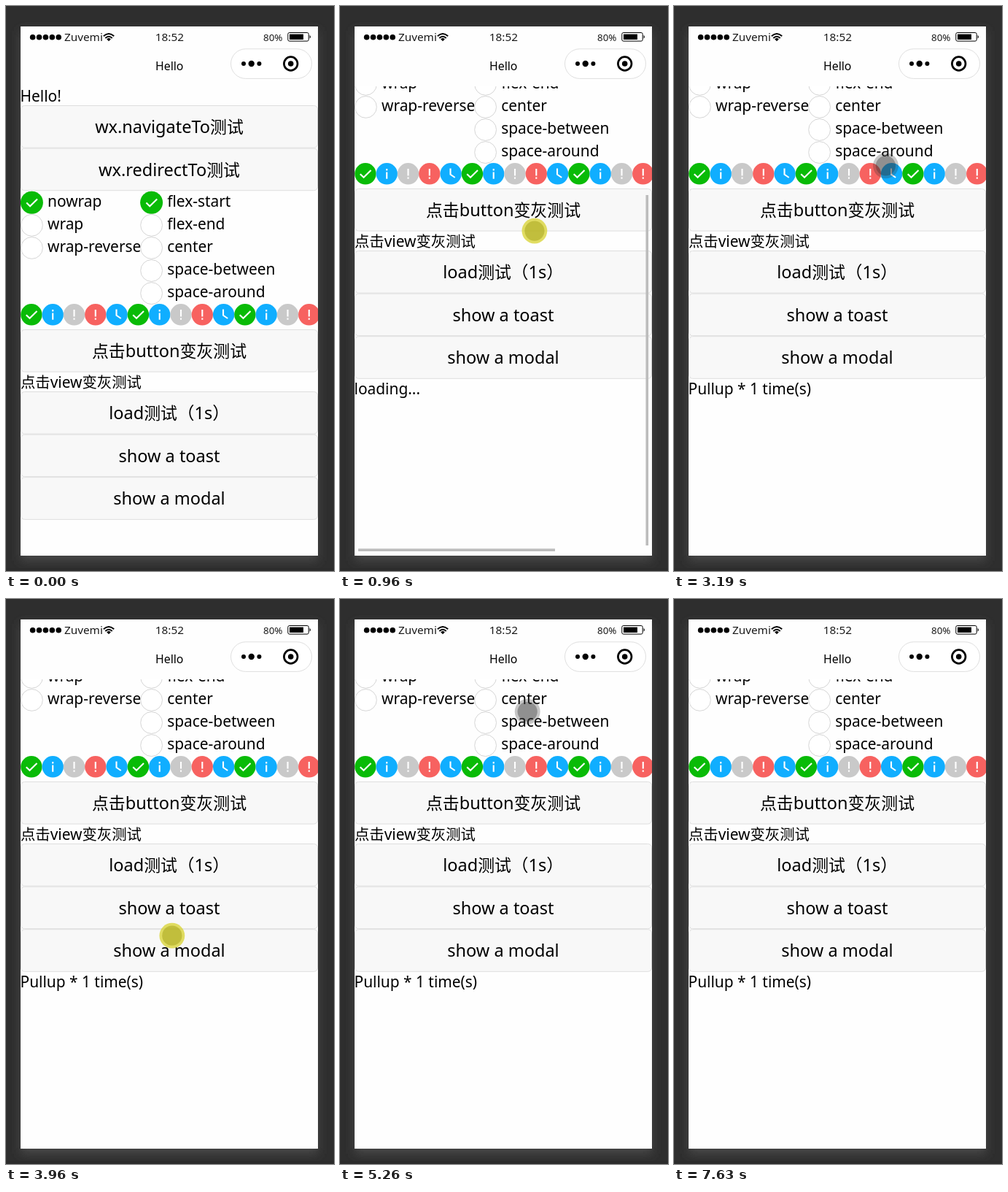
Recreate the animation shown at these times as an HTML page. Size 450 by 774 pixels, loop 7760 ms.

```html
<!DOCTYPE html>
<html lang="zh-CN">
<head>
<meta charset="utf-8">
<title>Hello</title>
<style>
html, body { margin: 0; width: 100%; height: 100%; overflow: hidden; background: #2e2e2e; }
svg { display: block; width: 450px; height: 774px; }
text { font-family: "Noto Sans", "Noto Sans CJK SC", "Noto Sans CJK", sans-serif; font-size: 20.9px; fill: #000; white-space: pre; }
.han { font-size: .975em; }
.button text { font-size: 23.5px; text-anchor: middle; }
.button rect { fill: #f8f8f8; stroke: #dedede; }
.glyph { fill: none; stroke: #fff; stroke-width: 2.1; }
.status { font-size: 15.3px; fill: #1a1a1a; }
</style>
</head>
<body>
<svg viewBox="0 0 450 774" xmlns="http://www.w3.org/2000/svg">
  <defs>
    <clipPath id="view"><rect x="20" y="110" width="408" height="643"/></clipPath>
    <filter id="soft" x="-20%" y="-20%" width="140%" height="140%"><feGaussianBlur stdDeviation="7"/></filter>
  </defs>
  <rect width="450" height="774" fill="#2e2e2e"/>
  <rect x="20" y="34" width="408" height="726" fill="#484848" filter="url(#soft)"/>
  <rect y="770" width="450" height="4" fill="#2c2c2c"/>
  <rect x="20" y="28" width="408" height="725" fill="#fefefe"/>

  <g clip-path="url(#view)">
    <g id="page"></g>
    <g id="bars" fill="#bcbcbc">
      <rect id="thumb" x="419.5" width="3.6" height="480"/>
      <rect x="25" y="743.4" width="270" height="3.6"/>
    </g>
  </g>

  <g id="signal"></g>
  <text class="status" x="80" y="47.5">Zuvemi</text>
  <path d="M133.8 41.2Q141 34.6 148.2 41.2M136.3 44Q141 39.6 145.7 44" fill="none" stroke="#000" stroke-width="1.9"/>
  <path d="M138.2 45.4Q141 42.8 143.8 45.4L141 48.2Z"/>
  <text class="status" x="224.4" y="47.8" text-anchor="middle">18:52</text>
  <text class="status" x="353" y="47.5" style="font-size:13.4px">80%</text>
  <rect x="386.8" y="36.5" width="28.4" height="11.6" rx="2" fill="none" stroke="#000"/>
  <rect x="389" y="38.6" width="19" height="7.4"/>
  <path d="M416.6 39.8Q419.4 42.3 416.6 44.8Z"/>

  <text x="224.2" y="88" text-anchor="middle" style="font-size:15.8px">Hello</text>
  <rect x="308.5" y="58.8" width="111" height="40.6" rx="20.3" fill="#fff" stroke="#dfdfdf"/>
  <circle cx="326" cy="79" r="3"/><circle cx="336.7" cy="79" r="4.2"/><circle cx="347.4" cy="79" r="3"/>
  <circle cx="390.7" cy="79" r="9.3" fill="none" stroke="#000" stroke-width="2.7"/>
  <circle cx="390.7" cy="79" r="3.8"/>

  <g id="cursor"><circle id="ring" r="17.4"/><circle id="core" r="13.6"/></g>
</svg>
<script>
const LOOP = 7760;
const MAX_SCROLL = 193;
const BUTTON_STEP = 58.6;
const $ = id => document.getElementById(id);
const page = $("page");

function add(parent, tag, attrs) {
  const el = document.createElementNS("http://www.w3.org/2000/svg", tag);
  for (const key in attrs) el.setAttribute(key, attrs[key]);
  parent.appendChild(el);
  return el;
}

// Chinese runs are set slightly smaller than the Latin ones
function label(x, y, text, parent = page) {
  const el = add(parent, "text", { x, y });
  for (const run of text.match(/[\u4e00-\u9fff]+|[^\u4e00-\u9fff]+/g) || []) {
    const han = /[\u4e00-\u9fff]/.test(run);
    add(el, "tspan", { class: han ? "han" : "latin" }).textContent = run;
  }
  return el;
}

function buttons(top, names) {
  names.forEach((name, i) => {
    const y = top + BUTTON_STEP * i;
    const g = add(page, "g", { class: "button" });
    add(g, "rect", { x: 20.5, y: y + 0.5, width: 407, height: 57.6, rx: 5 });
    label(224, y + 38, name, g);
  });
}

const CHECK = "M-7.2 .4L-2.4 5L7.6 -4.8";
const BANG = "M0 -6.8V2.6M0 4.6V7";
const ICONS = [
  ["#09bb07", CHECK],
  ["#10aeff", "M0 -6.8V-4.4M0 -2.2V7"],
  ["#c9c9c9", BANG],
  ["#f76260", BANG],
  ["#10aeff", "M-.6 -7.4V1L5.6 5.2"]
];

function icon(x, y, r, [fill, d]) {
  const g = add(page, "g", { transform: `translate(${x} ${y})` });
  add(g, "circle", { r, fill });
  add(g, "path", { d, class: "glyph" });
}

function radios(x, names) {
  names.forEach((name, i) => {
    const y = 269.2 + 31.1 * i;
    if (i === 0) icon(x, y, 15.5, ICONS[0]);
    else add(page, "circle", { cx: x, cy: y, r: 14.9, fill: "#fff", stroke: "#d6d6d6" });
    label(x + 21.6, y + 5.4, name);
  });
}

label(19.5, 131, "Hello!");
buttons(136, ["wx.navigateTo测试", "wx.redirectTo测试"]);
radios(35.4, ["nowrap", "wrap", "wrap-reverse"]);
radios(199.6, ["flex-start", "flex-end", "center", "space-between", "space-around"]);
for (let i = 0; i < 14; i++) icon(34.9 + 29.3 * i, 422.8, 14.7, ICONS[i % ICONS.length]);
buttons(443, ["点击button变灰测试"]);
label(20, 523, "点击view变灰测试");
buttons(528, ["load测试（1s）", "show a toast", "show a modal"]);
const footer = label(19.5, 725, "");

for (let i = 0; i < 5; i++) add($("signal"), "circle", { cx: 36.6 + 8.9 * i, cy: 42.8, r: 3.8 });

// Turning points of the pointer; it eases from one to the next
const TURNS = [
  { t: 130, x: 416, y: 754 },
  { t: 520, x: 300, y: 570 },
  { t: 1400, x: 234, y: 48 },
  { t: 1920, x: 271, y: 654 },
  { t: 2250, x: 273, y: 664 },
  { t: 2640, x: 243, y: 103 },
  { t: 2920, x: 293, y: 196 },
  { t: 3120, x: 293, y: 198 },
  { t: 3660, x: 232, y: 694 },
  { t: 4334, x: 222, y: 135 },
  { t: 4760, x: 208, y: 634 },
  { t: 5170, x: 260, y: 115 },
  { t: 5680, x: 223, y: 628 },
  { t: 6040, x: 272, y: 145 },
  { t: 6530, x: 211, y: 639 },
  { t: 6880, x: 250, y: 157 },
  { t: 7220, x: 431, y: 757 },
  { t: 7430, x: 434, y: 794 }
];

const clamp = (v, low, high) => Math.max(low, Math.min(high, v));
const mix = (a, b, k) => a + (b - a) * k;
const ease = k => 0.5 - 0.5 * Math.cos(Math.PI * k);

function pointer(t) {
  const next = TURNS.findIndex(p => p.t > t);
  if (next < 1) return { shown: false, pressed: false, x: 0, y: 0 };
  const a = TURNS[next - 1], b = TURNS[next];
  const k = (t - a.t) / (b.t - a.t);
  const swipeUp = a.y > 500 && b.y < 200;
  return {
    shown: true,
    pressed: swipeUp && k > 0.08 && k < 0.92,
    x: mix(a.x, b.x, ease(k)),
    y: mix(a.y, b.y, ease(k))
  };
}

// The first swipe drags the page to its end, where it stays
function scrollAt(t, y) {
  if (t < 520) return 0;
  return t < 955 ? clamp(552 - y, 0, MAX_SCROLL) : MAX_SCROLL;
}

function draw(t) {
  const { shown, pressed, x, y } = pointer(t);
  const scroll = scrollAt(t, y);

  page.setAttribute("transform", `translate(0 ${-scroll})`);
  $("bars").setAttribute("visibility", scroll > 0 && t < 1105 ? "visible" : "hidden");
  $("thumb").setAttribute("y", 113 + 146 * scroll / MAX_SCROLL);
  footer.textContent = t < 955 ? "" : t < 1915 ? "loading..." : "Pullup * 1 time(s)";

  $("cursor").setAttribute("visibility", shown ? "visible" : "hidden");
  $("cursor").setAttribute("transform", `translate(${x} ${y})`);
  $("ring").setAttribute("fill", pressed ? "rgba(215,210,40,.72)" : "rgba(50,50,50,.28)");
  $("core").setAttribute("fill", pressed ? "rgba(150,148,10,.42)" : "rgba(50,50,50,.36)");
}

function tick() {
  draw(performance.now() % LOOP);
  requestAnimationFrame(tick);
}
tick();
</script>
</body>
</html>
```
